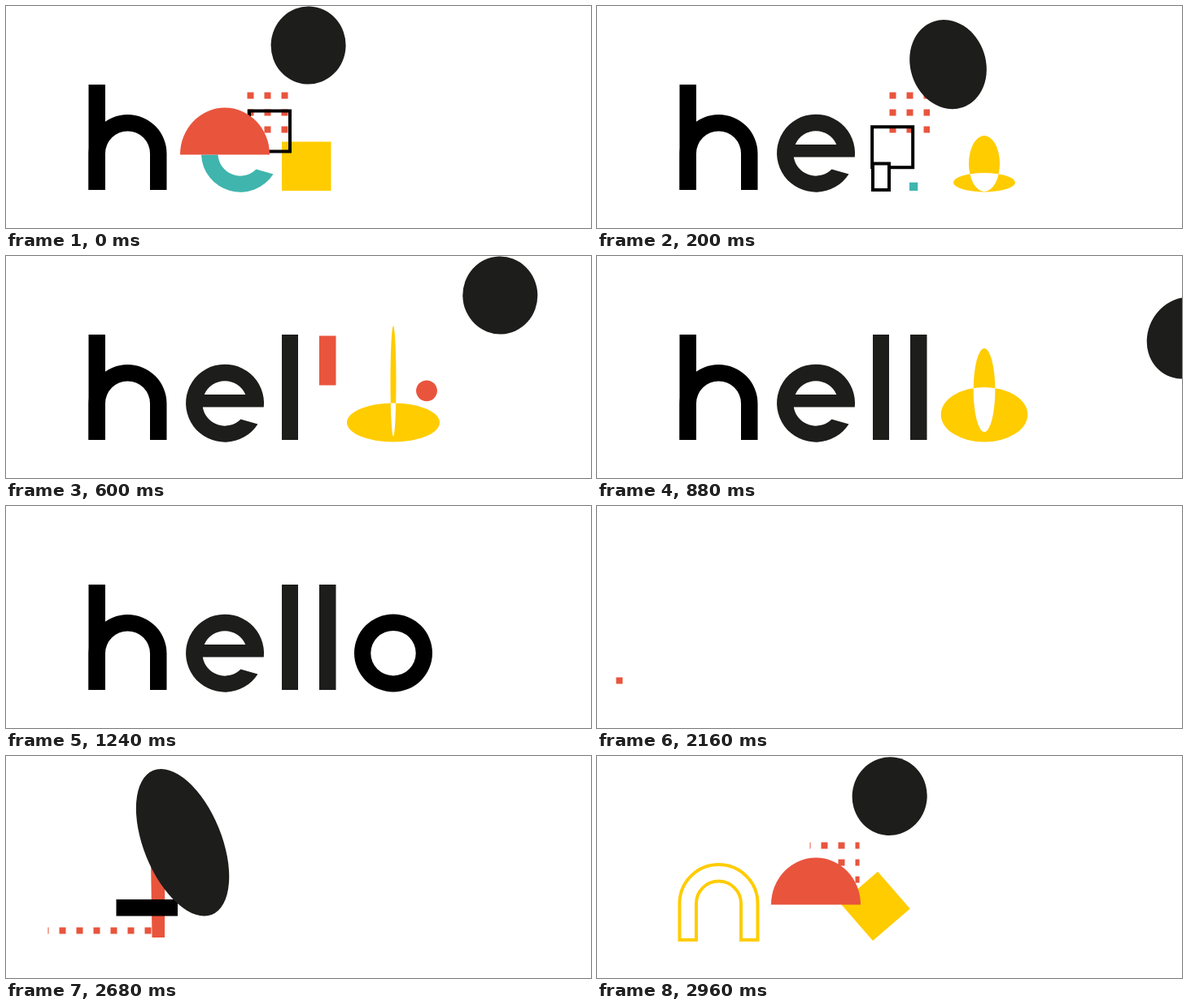
Recreate the animation shown at these times as an HTML page with a canvas. Size 719x274 px, loop 3000 ms.

```html
<!DOCTYPE html>
<html lang="en">
<head>
<meta charset="utf-8">
<title>hello</title>
<style>
html, body { margin: 0; width: 100%; height: 100%; overflow: hidden; background: #fff; }
canvas { display: block; }
</style>
</head>
<body>
<canvas id="stage" width="719" height="274"></canvas>
<script>
const ctx = document.getElementById('stage').getContext('2d');
const INK = '#1d1d1b', RED = '#e9543d', YELLOW = '#ffcc00', TEAL = '#3fb5ae';
const LOOP = 3000, STEP = 40, LEAD = 840; // the loop opens 840 ms into the story

const arch = new Path2D('M101.5 227V182a48 48 0 0 1 96 0V227H177V182a27.5 27.5 0 0 0-55 0V227Z');
const letterE = new Path2D('M316.8 186.5A48 48 0 1 0 309.5 207.5L288.5 201.5A27.5 27.5 0 0 1 241.8 186.5Z' +
  'M243.7 171A27.5 27.5 0 0 1 294.3 171Z');
const hook = new Path2D('M221 183.5A48 48 0 0 0 309.5 207.5L288.5 201.5A27.5 27.5 0 0 1 241.5 183.5Z');

// Poses of the o: outer rx, ry, hole rx, ry, hole centre y
const flat = [38, 11.7, 19, 80.5, 148.5];
const wide = [57, 24, 3.5, 68, 154.5];
const round = [48, 48, 27.7, 27.7, 181.7];

const ramp = (u, from, to) => Math.min(1, Math.max(0, (u - from) / (to - from)));
const during = (u, from, to) => u >= from && u < to;
const smooth = p => p * p * (3 - 2 * p);
const mix = (a, b, p) => a.map((v, i) => v + (b[i] - v) * p);

function rect(color, x, y, w, h) {
  ctx.fillStyle = color;
  ctx.fillRect(x, y, w, h);
}

function fill(color, path) {
  ctx.fillStyle = color;
  ctx.fill(path, 'evenodd');
}

function ellipse(color, x, y, rx, ry, tilt = 0, start = 0) {
  const path = new Path2D();
  path.ellipse(x, y, rx, ry, tilt, start, Math.PI * 2);
  fill(color, path);
}

function frame(x, y, w, h) {
  ctx.strokeStyle = '#000';
  ctx.lineWidth = 4;
  ctx.strokeRect(x, y, w, h);
}

function dots(left, right, rows) {
  ctx.save();
  ctx.beginPath();
  ctx.rect(left, 0, Math.max(0, right - left), 274);
  ctx.clip();
  for (const y of rows) {
    for (let x = 27.5; x < 430; x += 21) rect(RED, x - 4, y - 4, 8, 8);
  }
  ctx.restore();
}

function drawDots(u) {
  if (u < 640) dots(19 + 171 * (u / 640) ** 8, Math.min(187, 33 + 0.35 * u), [215.5]);
  if (during(u, 700, 1400)) {
    const left = 247 + 107 * (1 - (1 - ramp(u, 780, 1200)) ** 3);
    const right = left + 61 * ramp(u, 680, 780);
    dots(left + 61 * ramp(u, 1220, 1400), right, [110.5, 131.5, 152.5]);
  }
}

function drawBlocks(u) {
  if (during(u, 750, 960)) {
    const side = 60.5, turns = (u - 840) / 88, done = Math.ceil(turns);
    ctx.save();
    ctx.translate(339 + side * done, 228);
    ctx.rotate((turns - done) * Math.PI / 2);
    rect(YELLOW, 0, -side, side, side);
    ctx.restore();
  }
  if (during(u, 1040, 1400)) {
    const side = 41 * ramp(u, 1000, 1160) * (1 - ramp(u, 1260, 1400));
    rect(TEAL, 384, 228 - side, side, side);
  }
  if (during(u, 840, 1400)) {
    const p = ramp(u, 840, 1200), size = 50 * (1 - ramp(u, 1240, 1400));
    frame(324 + 70.5 * p - size / 2, 154.5 + 35.5 * p - size / 2, size, size);
  }
}

function drawH(u) {
  if (during(u, 360, 640)) {
    const top = 224 - 127 * ramp(u, 360, 480) * (1 - ramp(u, 540, 640));
    fill(RED, new Path2D(`M177.5 ${top}H195.5L195 224H179.5Z`));
    rect('#000', 135.5, 177, 75.5 * ramp(u, 420, 520) * (1 - ramp(u, 560, 640)), 20.5);
  }
  if (during(u, 640, 840)) {
    ctx.strokeStyle = YELLOW;
    ctx.lineWidth = 4;
    ctx.lineCap = 'square';
    ctx.setLineDash([600 * ramp(u, 620, 800), 600]);
    ctx.stroke(arch);
    ctx.setLineDash([]);
  }
  if (u >= 840) {
    fill('#000', arch);
    rect('#000', 101.5, 97, 20.5, 130);
  }
}

function drawE(u) {
  if (during(u, 840, 1000)) {
    ctx.save();
    ctx.translate(19 * (1 - ramp(u, 840, 980)), 0);
    fill(TEAL, hook);
    ctx.restore();
  }
  if (during(u, 680, 1000)) {
    const size = ramp(u, 660, 780) * (1 - 0.13 * ramp(u, 860, 1000));
    ellipse(RED, 269, 183.5, 55 * size, 58 * size, 0, Math.PI);
  }
  if (u >= 1000) fill(INK, letterE);
}

function drawL(u) {
  if (during(u, 1040, 1320)) {
    const h = 130 * ramp(u, 1000, 1160);
    rect('#fff', 339, 227 - h, 20, h);
    frame(339, 227 - h, 20, h);
  }
  if (u >= 1320) rect(INK, 339, 97, 20, 130);
  if (during(u, 1320, 1640)) rect(RED, 385, 98.5, 20.5, 128.5 * ramp(u, 1326, 1566));
  if (u >= 1640) rect(INK, 385, 97, 20.5, 130);
}

function drawO(u) {
  if (u < 960) return;
  const grow = ramp(u, 920, 1200);
  const [rx, ry, holeX, holeY, cy] = u < 1440
    ? mix(flat, wide, smooth(ramp(u, 1200, 1440)))
    : mix(wide, round, smooth(ramp(u, 1440, 2080)));
  const ring = new Path2D();
  ring.ellipse(476, 229.5 - ry, rx, ry, 0, 0, Math.PI * 2);
  ring.closePath();
  ring.moveTo(476 + holeX, 229 + (cy - 229) * grow);
  ring.ellipse(476, 229 + (cy - 229) * grow, holeX, holeY * grow, 0, 0, Math.PI * 2);
  fill(u < 2000 ? YELLOW : '#000', ring);
}

function drawPip(u) {
  const p = ramp(u, 1320, 1720);
  ellipse(RED, 487 + 100 * p, 210 - 208 * p * (1 - p), 16 * Math.sin(Math.PI * p), 16 * Math.sin(Math.PI * p));
}

// Each bounce is weaker than the last; phase is 0 at the top and +-1 on the ground
function drawBall(u) {
  const period = 560, since = u - 860;
  const phase = 2 * (since / period - Math.round(since / period));
  const force = 0.74 ** Math.max(0, Math.floor(since / period) + 1);
  const entry = 0.0013 * Math.max(0, 300 - u) ** 2;
  const x = 379 + 0.394 * since - 30 * force ** 1.5 * Math.sin(Math.PI * phase * Math.abs(phase)) - entry;
  const y = 48.5 + 120 * force * Math.abs(phase) ** 3;
  const stretch = 51.5 * force ** 4 * Math.sin(Math.PI * phase ** 4);
  ellipse(INK, x, y, 46 + 0.04 * stretch, 48 + stretch, -0.49 * phase);
}

function draw(u) {
  rect('#fff', 0, 0, 719, 274);
  for (const part of [drawDots, drawBlocks, drawH, drawE, drawL, drawO, drawPip, drawBall]) part(u);
}

const start = performance.now();
function tick() {
  const time = Math.floor((performance.now() - start) / STEP) * STEP;
  draw((time + LEAD) % LOOP);
  requestAnimationFrame(tick);
}
tick();
</script>
</body>
</html>
```
